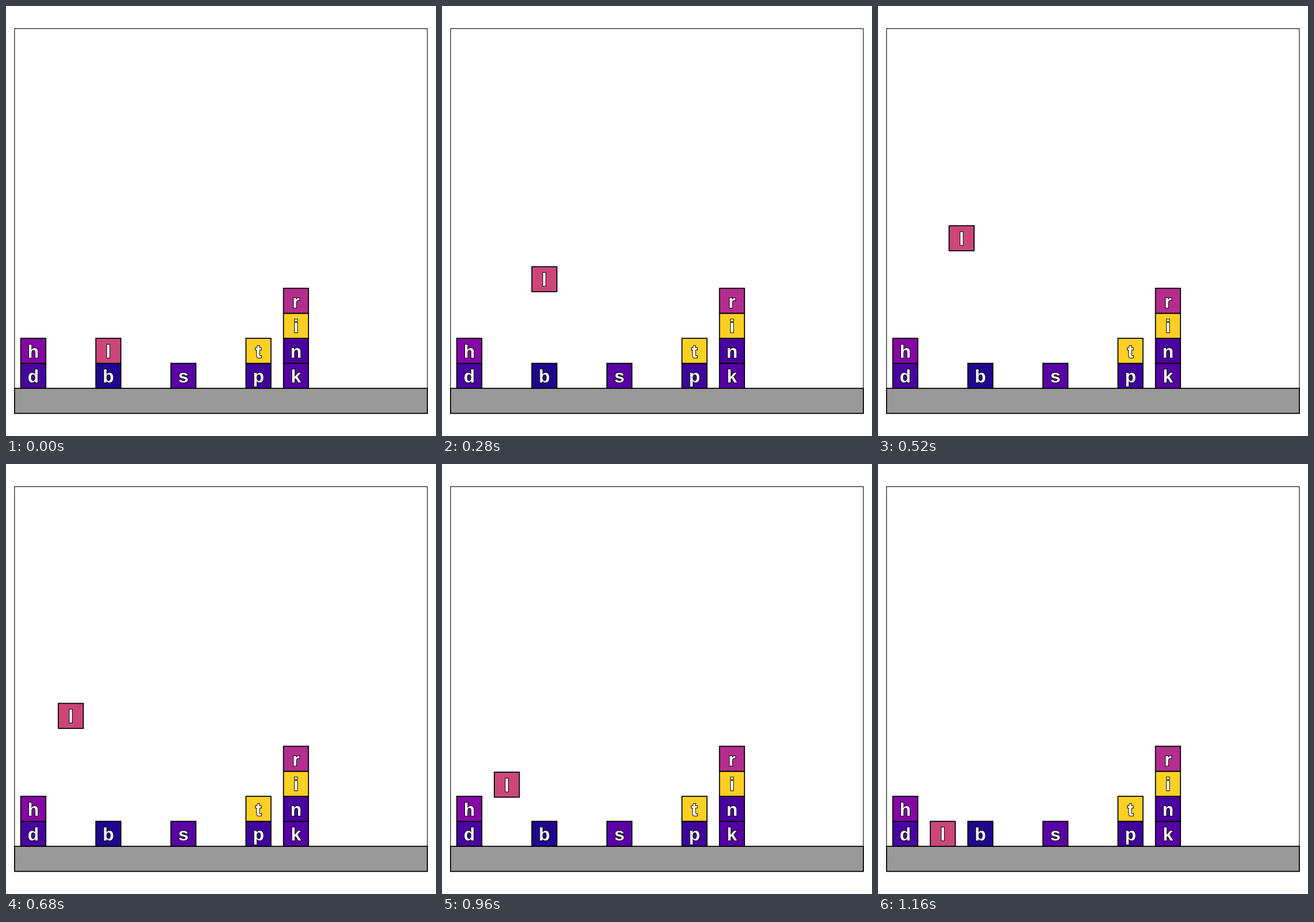
These frames come from a looping animation (748x748 px, 1.2 s). An HTML page with a canvas:

```html
<!DOCTYPE html>
<html lang="en">
<head>
<meta charset="utf-8">
<title>Moving blocks</title>
<style>
html, body { margin: 0; width: 100%; height: 100%; overflow: hidden; background: #fff; }
canvas { display: block; width: 748px; height: 748px; }
</style>
</head>
<body>
<canvas id="stage"></canvas>
<script>
const SIZE = 748, CELL = 43.52, LEFT = 14.85, TOP = 39.4, GROUND = 665.1;
const WIDTH = 16.5 * CELL;
const STEP = 40, STEPS = 30;

const blocks = [
  // letter, column, level, colour
  ["d", 0, 0, "#4903a0"], ["h", 0, 1, "#8606a6"],
  ["b", 2, 0, "#20068f"],
  ["s", 4, 0, "#5901a5"],
  ["p", 6, 0, "#3f049c"], ["t", 6, 1, "#fdd025"],
  ["k", 7, 0, "#5601a4"], ["n", 7, 1, "#4903a0"],
  ["i", 7, 2, "#fdd025"], ["r", 7, 3, "#b42e8d"]
];

// step, column, level of the moving block; linear in between
const path = [[0, 2, 1], [11, 2, 5.5], [15, 1, 5.5], [29, 1, 0]];

const canvas = document.getElementById("stage");
const ratio = window.devicePixelRatio || 1;
canvas.width = canvas.height = SIZE * ratio;
const ctx = canvas.getContext("2d");
ctx.scale(ratio, ratio);
ctx.textAlign = "center";
ctx.lineJoin = "miter";
ctx.font = "bold 32px 'Liberation Sans', Arial, sans-serif";

function box(x, y, w, h, fill, line) {
  ctx.fillStyle = fill;
  ctx.fillRect(x, y, w, h);
  ctx.strokeStyle = "#000";
  ctx.lineWidth = line;
  ctx.strokeRect(x, y, w, h);
}

function block(letter, column, level, colour) {
  const x = LEFT + CELL * (0.25 + 1.5 * column);
  const y = GROUND - CELL * (level + 1);
  box(x, y, CELL, CELL, colour, 1.75);
  const cx = x + CELL / 2, base = y + 33.7;
  ctx.lineWidth = 2;
  ctx.strokeText(letter, cx, base);
  ctx.fillStyle = "#fff";
  ctx.fillText(letter, cx, base);
}

function position(step) {
  const i = path.findIndex(p => p[0] > step);
  if (i < 0) return path[path.length - 1].slice(1);
  const a = path[i - 1], b = path[i];
  const u = (step - a[0]) / (b[0] - a[0]);
  return [1, 2].map(k => a[k] + (b[k] - a[k]) * u);
}

function draw(now) {
  const step = Math.floor(now / STEP) % STEPS;
  ctx.fillStyle = "#fff";
  ctx.fillRect(0, 0, SIZE, SIZE);
  box(LEFT, TOP, WIDTH, GROUND + CELL - TOP, "#fff", 1.1);
  box(LEFT, GROUND, WIDTH, CELL, "#999", 1.75);
  blocks.forEach(b => block(...b));
  block("l", ...position(step), "#cc4778");
}

const start = performance.now();
function tick() {
  draw(performance.now() - start);
  requestAnimationFrame(tick);
}
tick();
</script>
</body>
</html>
```
